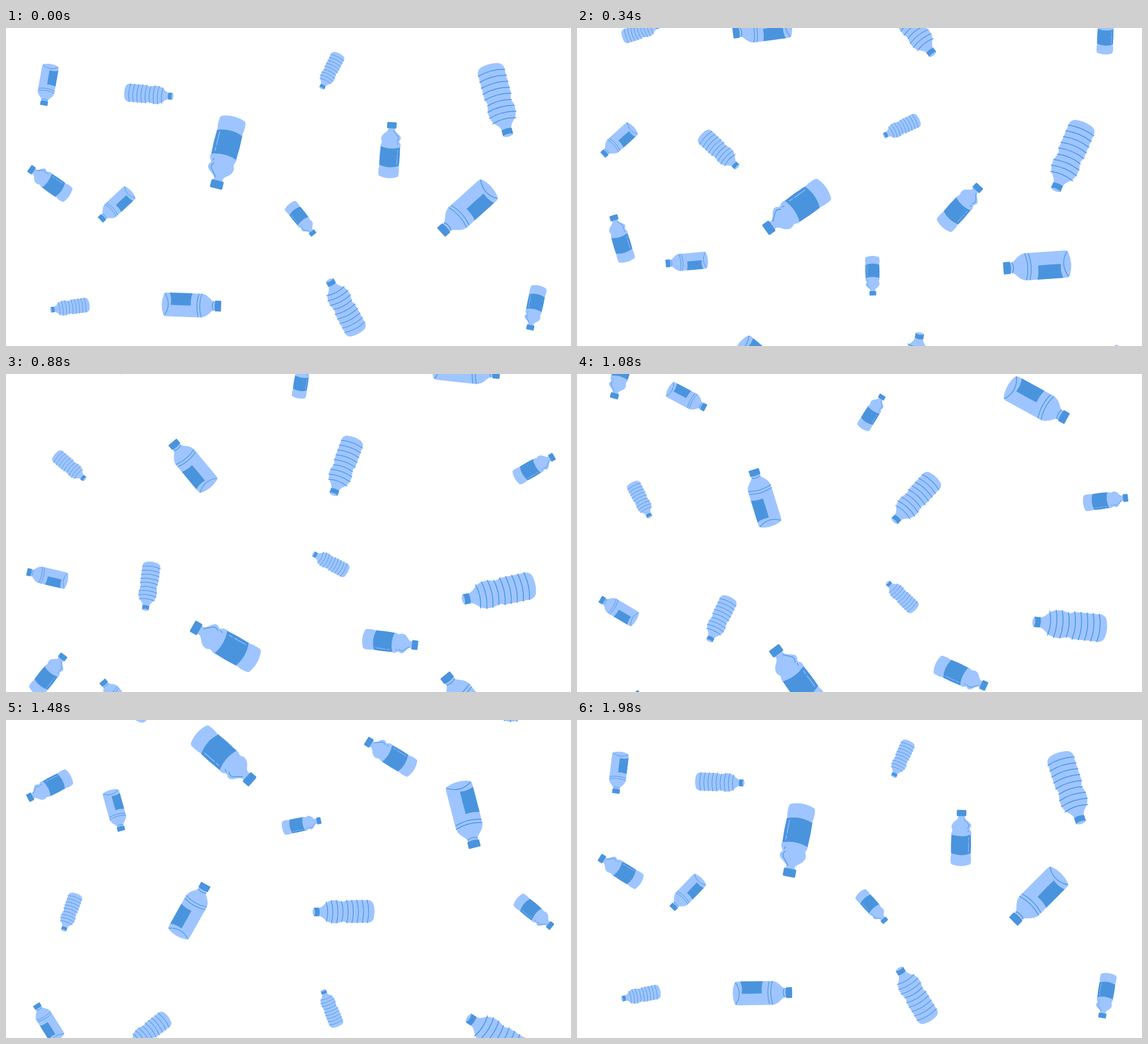
An HTML page with a canvas for the animation above (2000 ms loop, 998 by 561 pixels).

```html
<!DOCTYPE html>
<html lang="en">
<head>
<meta charset="utf-8">
<title>Falling bottles</title>
<style>
html, body { margin: 0; width: 100%; height: 100%; overflow: hidden; background: #fff; }
canvas { display: block; }
</style>
</head>
<body>
<canvas id="stage" width="998" height="561"></canvas>
<script>
const ctx = document.getElementById('stage').getContext('2d');
const LIGHT = '#9ec5ff', DARK = '#4a94de';
const LOOP = 2000, LAP = 2.005, FALL = 292.3;

const fill = (d, color) => ({ path: new Path2D(d), color });
const line = (d, color = DARK, width = 1.15) => ({ path: new Path2D(d), color, width });

// Bottles are 100 units long and lie on the x axis, cap to the right.
const ribs = Array.from({ length: 9 }, (_, i) => {
  const x = -38 + 8.3 * i;
  const r = i === 5 ? 16.8 : i === 8 ? 16 : 18.4;
  return `M${x} ${-r}Q${x - 5} 0 ${x} ${r}`;
}).join('');

const ribbed = [
  fill('M-42-18Q-38-19-34-18Q-30-19-26-18Q-22-19-18-18Q-14-19-10-18Q-6-19-2-17Q2-15 6-17Q11-19 16-18.5Q23-18 28-15C33-10 36-7 41-6.5V6.5C36 7 33 10 28 15Q23 18 16 18.5Q11 19 6 17Q2 15-2 17Q-6 19-10 18Q-14 19-18 18Q-22 19-26 18Q-30 19-34 18Q-38 19-42 18Q-48 16-49 9Q-51 0-49-9Q-48-16-42-18Z', LIGHT),
  line(ribs),
  fill('M40-7L48-7Q52 0 48 7L40 7Q38 0 40-7Z', DARK),
  fill('M48-6.5C51-5 51 5 48 6.5C46 4 46-4 48-6.5Z', LIGHT)
];

const smooth = [
  fill('M-47-17Q-45-20-41-20L11-20Q12-19 13-20L17-20C27-19 31-11 36-8L41-7V7L36 8C31 11 27 19 17 20L13 20Q12 19 11 20L-41 20Q-45 20-47 17Q-53 0-47-17Z', LIGHT),
  fill('M-37-20L1-20Q-2-9-1 .5Q-18 1-35 .5Q-33-10-37-20Z', DARK),
  line('M-45-18.5Q-33 0-45 18.5M12-19.5Q6 0 12 19.5M17-19.5Q11 0 17 19.5M37-7.5Q33 0 37 7.5'),
  fill('M41-9L49-9Q50-9 50-8L50 8Q50 9 49 9L41 9Q39.5 9 39.5 8Q38 0 39.5-8Q39.5-9 41-9Z', DARK)
];

const waisted = [
  fill('M-47-16Q-45-18.5-41-18Q-39-19-37-18Q-34-19-31-17.5L5-17.5Q9-18 11-16.5Q14-15 16-16.5Q20-18.5 24-16.5C30-14 31-8 36-6L41-6V6L36 6C31 8 30 14 24 17.5Q20 18 18 15.5Q15 14.5 13 17Q10 19 5 17.5L-31 17.5Q-34 19-37 18Q-39 19-41 18Q-45 18.5-47 16Q-53 0-47-16Z', LIGHT),
  fill('M-27-17.5Q-11-18.5 6-17.2Q0 0 6 17.2Q-11 18.5-27 17.5Q-34 0-27-17.5Z', DARK),
  line('M-25 13.5H-7M-4 13.5H1', LIGHT, 0.9),
  line('M35 4Q28 10 24 13Q20 14 17 11M14 13L11 12', DARK, 1),
  fill('M40-8.5L49-8.5Q50-8 50-7L50 7Q50 8 49 8.5L40 8.5Q39 8 39 7L39-7Q39-8 40-8.5Z', DARK)
];

// shape, x, y, length, angle in degrees, slowing of the spin
const bottles = [
  [smooth, 73, 100, 74, 100],
  [ribbed, 252, 117, 87, 5],
  [waisted, 386.5, 219.5, 131, 104, 0],
  [ribbed, 573, 76, 70, 117, 10.5],
  [waisted, 678.5, 215.5, 99, -86],
  [ribbed, 870.5, 127.5, 132, 75],
  [waisted, 76.5, 272, 86, 215],
  [smooth, 194, 313, 75, 137],
  [waisted, 522, 337.5, 70, 51],
  [smooth, 813, 320.5, 120, 138],
  [ribbed, 113, 492.5, 70, 172],
  [smooth, 327.5, 489, 105, 2],
  [ribbed, 596.5, 491.5, 109, 242],
  [waisted, 933.5, 493.5, 80, 102]
];

// Degrees turned after s seconds: even spin on the way in, slowing on the way out.
const spin = (s, slow) => s < 0
  ? 120 * s - 2.2 * s ** 3
  : (120 - 0.8 * slow) * s - slow * s ** 3;

function drawBottle([shape, x, y, length, angle, slow = 9], s) {
  ctx.save();
  ctx.translate(x, y + FALL * s);
  ctx.rotate((angle + spin(s, slow)) * Math.PI / 180);
  ctx.scale(length / 100, length / 100);
  for (const { path, color, width } of shape) {
    ctx.fillStyle = ctx.strokeStyle = color;
    if (width) {
      ctx.lineWidth = width;
      ctx.stroke(path);
    } else {
      ctx.fill(path);
    }
  }
  ctx.restore();
}

let start;
function frame(now) {
  start ??= now;
  const t = (now - start) % LOOP / 1000;
  ctx.fillStyle = '#fff';
  ctx.fillRect(0, 0, 998, 561);
  ctx.lineCap = ctx.lineJoin = 'round';
  for (const bottle of bottles) {
    drawBottle(bottle, t);
    drawBottle(bottle, t - LAP);
  }
  requestAnimationFrame(frame);
}
requestAnimationFrame(frame);
</script>
</body>
</html>
```
